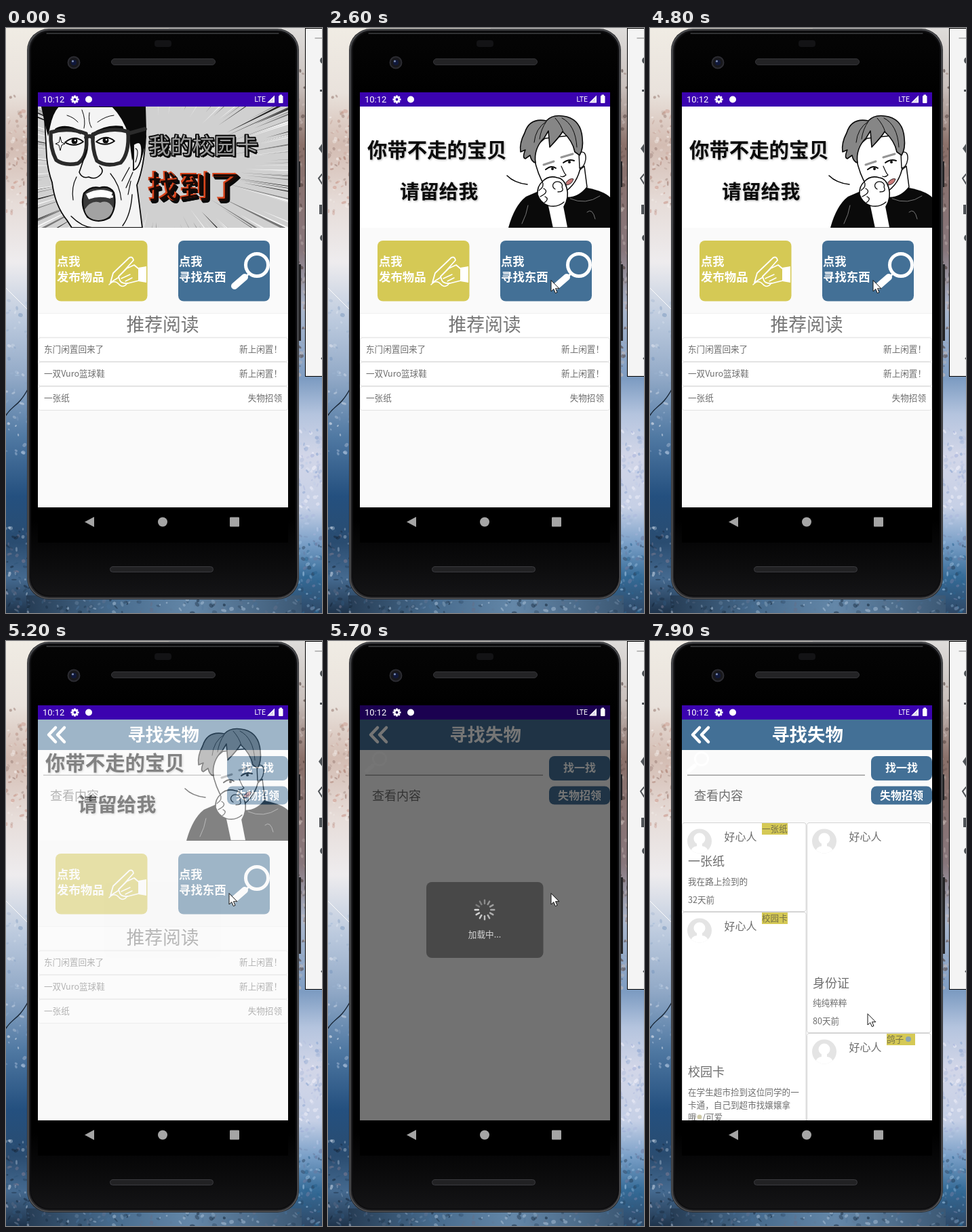
These frames come from a looping animation (466x864 px, 8000 ms). An HTML page with a canvas:

```html
<!DOCTYPE html>
<html lang="zh">
<head>
<meta charset="utf-8">
<style>
html, body { margin: 0; width: 100%; height: 100%; overflow: hidden; background: #000; }
canvas { display: block; width: 466px; height: 864px; }
</style>
</head>
<body>
<canvas id="stage"></canvas>
<script>
const W = 466, H = 864, LOOP = 8000;
const SCREEN = { x: 47, y: 95, w: 369, h: 613 };
const CJK = '"Noto Sans CJK SC", "Noto Sans CJK", "Noto Sans", sans-serif';
const INK = '#6e6e6e', PAPER = '#fafafa', WHITE = '#fff';
const BLUE = '#437096', GOLD = '#d5c955', LINE = '#dedede', BLACK = '#0a0a0a';
const scale = window.devicePixelRatio || 1;

const stage = document.getElementById('stage');
stage.width = W * scale;
stage.height = H * scale;
let g = stage.getContext('2d');

// ---------- helpers ----------
const clamp = v => Math.max(0, Math.min(1, v));
const ramp = (t, from, to) => clamp((t - from) / (to - from));
const smooth = v => v * v * (3 - 2 * v);

function seeded(seed) {
  return () => (seed = (seed * 16807) % 2147483647) / 2147483647;
}

function rect(x, y, w, h, fill) {
  g.fillStyle = fill;
  g.fillRect(x, y, w, h);
}

function paint(path, fill, stroke, lw) {
  if (fill) { g.fillStyle = fill; g.fill(path); }
  if (stroke) {
    g.strokeStyle = stroke;
    g.lineWidth = lw;
    g.lineCap = g.lineJoin = 'round';
    g.stroke(path);
  }
}

function round(x, y, w, h, r, fill, stroke, lw = 1) {
  const p = new Path2D();
  p.roundRect(x, y, w, h, r);
  paint(p, fill, stroke, lw);
}

function disc(x, y, r, fill, stroke, lw = 1) {
  const p = new Path2D();
  p.arc(x, y, r, 0, Math.PI * 2);
  paint(p, fill, stroke, lw);
}

function shape(d, fill, stroke, lw = 1) {
  paint(new Path2D(d), fill, stroke, lw);
}

function text(s, x, y, size, color = INK, { weight = 400, align = 'left', font = CJK } = {}) {
  g.font = `${weight} ${size}px ${font}`;
  g.textAlign = align;
  g.fillStyle = color;
  g.fillText(s, x, y);
}

// Heavy lettering, standing in for brush script
const bold = (s, x, y, size, color, align = 'left') =>
  text(s, x, y, size, color, { weight: 700, align });

function clipTo(x, y, w, h, draw) {
  g.save();
  g.beginPath();
  g.rect(x, y, w, h);
  g.clip();
  draw();
  g.restore();
}

function gradient(x0, y0, x1, y1, stops) {
  const gr = g.createLinearGradient(x0, y0, x1, y1);
  stops.forEach(([at, c]) => gr.addColorStop(at, c));
  return gr;
}

function layer(draw) {
  const c = document.createElement('canvas');
  c.width = W * scale;
  c.height = H * scale;
  const keep = g;
  g = c.getContext('2d');
  g.scale(scale, scale);
  draw();
  g = keep;
  return c;
}

const stamp = c => g.drawImage(c, 0, 0, W, H);

// ---------- desktop and phone ----------
function speckle(rnd, n, x, y, w, h, colors) {
  for (let i = 0; i < n; i++) {
    g.globalAlpha = 0.2 + rnd() * 0.45;
    g.fillStyle = colors[Math.floor(rnd() * colors.length)];
    g.beginPath();
    g.ellipse(x + rnd() * w, y + rnd() * h, 1 + rnd() * 3, 1 + rnd() * 2, rnd() * 3, 0, 7);
    g.fill();
  }
  g.globalAlpha = 1;
}

function wallpaper() {
  const rnd = seeded(77);
  rect(0, 0, 240, H, gradient(0, 0, 0, H, [
    [0, '#f0ece4'], [.11, '#e9e2dc'], [.2, '#d3bcb2'], [.3, '#e6dcd8'], [.4, '#eeecee'],
    [.5, '#bccade'], [.6, '#90a8c6'], [.7, '#4f78a2'], [.8, '#24507f'], [.88, '#2a4c70'],
    [.94, '#456a90'], [1, '#1f344c']]));
  rect(240, 0, 226, H, gradient(0, 0, 0, H, [
    [0, '#dedcda'], [.1, '#c9c0bc'], [.2, '#8a7069'], [.38, '#86757a'], [.48, '#a9b6cc'],
    [.6, '#7d9cc2'], [.66, '#b4c4de'], [.73, '#d2d6e8'], [.82, '#c6d0e6'], [.88, '#7ba0c8'],
    [.94, '#346a96'], [1, '#2f4866']]));
  rect(30, 838, 406, 26, gradient(30, 0, 436, 0, [
    [0, '#263c54'], [.3, '#466a8c'], [.6, '#6487a8'], [1, '#3c5874']]));
  speckle(rnd, 70, 0, 95, 34, 190, ['#a8786a', '#c8978a', '#f4eeea', '#9b8078']);
  speckle(rnd, 50, 0, 400, 34, 230, ['#a5bcd8', '#7f9cc0', '#dbe2ee']);
  speckle(rnd, 70, 0, 735, 34, 129, ['#16283c', '#b9c9dc', '#2f5478', '#7d7a90']);
  speckle(rnd, 70, 430, 60, 12, 455, ['#4b3a36', '#a08a84', '#c9bcb8']);
  speckle(rnd, 90, 432, 590, 34, 160, ['#f0f0fa', '#a9b4dc', '#bccce8', '#8ea6d0']);
  speckle(rnd, 70, 430, 750, 36, 114, ['#2a6490', '#6a7aa0', '#9cc0e0', '#20364e']);
  speckle(rnd, 110, 30, 843, 400, 21, ['#1c3046', '#a0b8d0', '#486f96', '#64708a']);
  shape('M0 572C10 556 18 560 33 532', null, '#1a2838', 1.5);
  shape('M0 384L32 416', null, '#fafafa', 1);
}

function sidePanel() {
  rect(441, 0, 25, 515, '#000');
  rect(442, 1, 24, 513, '#f4f4f4');
  const dark = '#505458';
  shape('M456 15H466', null, '#a6a6a6', 1.5);
  disc(468, 48, 5, dark);
  rect(463, 91, 3, 3, dark);
  shape('M466 171L461 178L466 185Z', dark);
  shape('M466 216L461 222L466 230', null, dark, 2);
  rect(462, 261, 4, 14, dark);
  disc(468, 310, 5, dark);
  disc(466, 488, 1.5, dark);
}

function phone() {
  rect(431, 197, 3, 38, '#242426');
  rect(431, 349, 4, 113, '#242426');
  round(31, 1, 401, 843, 32, '#2c2c2e');
  round(32.5, 2.5, 398, 840, 31, null, '#5a5c60', 1.2);
  round(36, 5, 392, 834, 28, gradient(0, 0, 0, H, [
    [0, '#050505'], [.12, '#000'], [.84, '#000'], [.92, '#0c0c0d'], [.98, '#161618']]),
    '#0e0e10', 2);
  shape('M60 8H402', null, '#5c5e62', 1);
  rect(47, 90, 369, 670, '#000');
  round(155.5, 45.5, 153, 9, 4.5, '#232325', '#343438');
  round(153.5, 795.5, 152, 8, 4, '#222224', '#3a3a3e');
  round(219, 18, 25, 10, 4, '#131315');
  disc(100, 51, 8.5, '#18181c', '#2c2c32', 2);
  disc(100, 51, 4, '#10183a');
  disc(98.5, 49, 1.6, '#7c8cb0');
  const nav = '#a5a5a5';
  shape('M116 729.5L130 722V737Z', nav);
  disc(231, 729.5, 7, nav);
  round(330, 722.5, 14, 14, 1, nav);
}

// ---------- banners ----------
function speedLines() {
  rect(47, 116, 369, 179, '#d0d0d0');
  const rnd = seeded(4021), cx = 225, cy = 205;
  for (let i = 0; i < 230; i++) {
    const a = rnd() * Math.PI * 2, near = 85 + rnd() * 85, half = 0.002 + rnd() * 0.010;
    const at = (r, da) => [cx + Math.cos(a + da) * r * 1.1, cy + Math.sin(a + da) * r * 0.75];
    g.fillStyle = rnd() < 0.45 ? '#f6f6f6' : rnd() < 0.5 ? '#222' : '#777';
    g.beginPath();
    g.moveTo(...at(near, 0));
    g.lineTo(...at(300, -half));
    g.lineTo(...at(300, half));
    g.fill();
  }
}

function faceBanner() {
  speedLines();
  const face = '#f4f4f4', ink = BLACK;
  shape('M56 116L60 190Q62 212 68 228Q72 262 90 284L97 295H201L193 232Q204 205 206 160L198 116Z', face, ink, 1.8);
  shape('M52 116H78Q69 126 65 146L62 160L57 140Z', ink);
  shape('M156 116H206L207 152Q206 176 199 196L194 170L186 196L181 158Q172 132 156 116Z', ink);
  shape('M188 172Q202 162 200 186Q198 206 188 210Z', face, ink, 1.8);
  shape('M191 178Q197 180 191 198', null, ink, 1.1);
  // brows, forehead creases and eyes
  shape('M72 149Q88 139 112 153L110 157Q90 147 73 154Z', ink);
  shape('M126 156Q148 141 172 145L174 150Q150 148 128 161Z', ink);
  shape('M112 121Q118 136 115 148M123 125Q121 139 126 147M90 129Q100 132 106 139M135 139Q147 130 159 129', null, ink, 1);
  for (const [x, y] of [[101, 168], [147, 167]]) {
    shape(`M${x - 14} ${y + 1}Q${x} ${y - 11} ${x + 13} ${y}Q${x} ${y + 9} ${x - 14} ${y + 1}Z`, WHITE, ink, 1.8);
    disc(x, y - 1, 4.5, ink);
    disc(x + 1, y - 2, 1.3, WHITE);
  }
  shape('M80 161L82 169L87 171L82 173L80 181L78 173L73 171L78 169Z', WHITE, ink, 1);
  // glasses
  const frame = '#2a2a2a';
  shape('M66 154Q92 146 118 156Q122 190 106 200Q86 204 74 195Q65 178 66 154Z', null, frame, 5.5);
  shape('M128 157Q156 146 180 153Q182 186 169 199Q148 206 134 196Q127 180 128 157Z', null, frame, 5.5);
  shape('M118 162Q123 157 128 162M180 156L205 149', null, frame, 5.5);
  // nose, cheeks, mouth
  shape('M119 180Q112 202 108 213Q112 223 122 220Q132 225 140 216M138 204Q145 210 140 216', null, ink, 1.6);
  shape('M104 220Q96 235 99 254M154 215Q168 232 170 254M182 206L171 226M187 213L177 236M184 226L180 246', null, ink, 1.2);
  shape('M115 244Q125 233 138 236Q152 232 159 243Q164 264 153 280Q135 290 120 279Q109 262 115 244Z', '#3a3a3a', ink, 2.2);
  shape('M118 245Q138 234 157 243L154 252Q138 247 122 253Z', WHITE);
  shape('M116 268Q126 253 139 258Q151 253 158 266Q155 283 136 284Q119 283 116 268Z', '#a2a2a2');
  disc(156, 249, 2, WHITE);
  shape('M96 278Q112 294 128 295M172 292Q184 276 186 246', null, ink, 1.4);

  // hollow line of lettering
  g.save();
  g.lineJoin = 'round';
  g.strokeStyle = ink;
  g.lineWidth = 2.4;
  bold('我的校园卡', 212, 188, 32.4, ink);
  g.strokeText('我的校园卡', 210, 186);
  text('我的校园卡', 210, 186, 32.4, '#9c9c9c', { weight: 300 });
  g.restore();
  // dark lettering with a glowing edge
  const title = '找到了';
  for (let i = 6; i > 2; i--) bold(title, 208 + i * .7, 250 + i * .7, 46, ink);
  bold(title, 208, 250, 46, '#d8441c');
  text(title, 209.6, 250.8, 46, '#1c0a06', { weight: 500 });
}

function treasureBanner() {
  rect(47, 116, 369, 179, WHITE);
  const ink = BLACK, skin = WHITE;
  g.save();
  g.shadowColor = '#a8a8a8';
  g.shadowBlur = 3 * scale;
  g.shadowOffsetX = g.shadowOffsetY = scale;
  bold('你带不走的宝贝', 58, 191, 29.4, ink);
  bold('请留给我', 106, 252, 28.8, ink);
  g.restore();
  shape('M264 218Q275 229 294 231', null, ink, 1.6);
  shape('M266 295Q275 262 292 249L322 236H382Q407 241 416 250V295Z', ink);
  shape('M382 272Q390 265 394 282M286 289Q293 275 295 262M357 252Q380 262 401 248', null, '#777', 1);
  shape('M341 235L378 204L382 235Q368 253 348 250Z', skin, ink, 1.5);
  shape('M302 178Q305 205 315 225Q332 250 352 240Q371 226 374 195L364 158L320 163Z', skin, ink, 1.6);
  shape('M370 184Q381 180 380 194Q378 206 371 207Z', skin, ink, 1.4);
  // hair
  shape('M322 137Q297 132 290 155Q282 170 284 183L291 180Q286 192 291 193L298 188Q300 198 306 199' +
        'Q303 178 319 162L325 152L327 176Q342 160 346 153Q361 167 364 183L371 188Q377 178 375 162' +
        'Q373 137 352 131Q332 126 322 137Z', '#868686', ink, 1.6);
  shape('M322 138Q306 148 304 169M322 138Q314 149 312 164M335 133Q344 143 347 154M345 133Q365 143 367 176', null, ink, 1);
  // features
  shape('M318 202L333 197M344 191L361 186', null, '#959595', 3);
  shape('M321 209Q329 202 336 207M347 199Q355 193 363 196', null, ink, 2);
  disc(331, 208, 2, ink);
  disc(356, 198, 2, ink);
  shape('M344 204Q349 216 351 217Q347 221 343 219', null, ink, 1.2);
  shape('M351 228Q357 221 362 223Q360 231 352 232Z', '#c87878', ink, .8);
  // fist and arm
  shape('M316 227Q308 234 309 246Q313 258 324 262L331 295H354L348 264Q356 250 352 236' +
        'Q348 222 338 221Q325 217 316 227Z', skin, ink, 1.6);
  shape('M316 227Q320 234 311 240M318 237Q327 242 313 249M320 249Q327 252 319 258' +
        'M335 238A7 6 0 1 1 345 235Q349 242 339 242M324 262Q338 266 348 257', null, ink, 1.3);
}

// ---------- home page ----------
function lens(x, y, s, color) {
  shape(`M${x - 13 * s} ${y + 14 * s}L${x - 17 * s} ${y + 18 * s}`, null, color, 3 * s);
  shape(`M${x - 18 * s} ${y + 18 * s}L${x - 33 * s} ${y + 31 * s}`, null, color, 10 * s);
  disc(x, y, 16.5 * s, null, color, 5 * s);
}

function homePage() {
  rect(47, 295, 369, 413, PAPER);
  round(73, 314, 135.5, 89.5, 8, GOLD);
  round(254, 314, 135, 89.5, 8, BLUE);
  bold('点我', 75, 351, 17.2, WHITE);
  bold('发布物品', 75, 373.5, 17.4, WHITE);
  bold('点我', 255, 351, 17.2, WHITE);
  bold('寻找东西', 255, 373.5, 17.4, WHITE);
  lens(370, 350, 1, WHITE);

  // writing hand
  shape('M154 376L158 362L182 339Q187 337 188 343L165 369Z', null, WHITE, 1.8);
  shape('M152 379Q160 371 166 378T178 378', null, WHITE, 1.6);
  shape('M166 367L178 355L189 350L196 356V373L180 377Q171 378 168 373Z', GOLD, WHITE, 1.8);
  shape('M170 370L183 364M176 374L186 369', null, WHITE, 1.4);
  shape('M195 354L207 352V376L195 374Z', WHITE);

  rect(47, 422, 369, 33, WHITE);
  rect(47, 421, 369, 1, '#f0f0f0');
  text('推荐阅读', 231, 447.5, 26.8, '#767676', { weight: 500, align: 'center' });
  [['东门闲置回来了', '新上闲置！'], ['一双Vuro篮球鞋', '新上闲置！'], ['一张纸', '失物招领']].forEach(([a, b], i) => {
    const y = 457 + i * 36;
    round(47.5, y + .5, 368, 35, 3, WHITE, LINE, .8);
    text(a, 56, y + 22, 12.6);
    text(b, 407, y + 22, 12.6, INK, { align: 'right' });
  });
}

// ---------- search page ----------
function searchPage() {
  rect(47, 116, 369, 592, PAPER);
  rect(47, 116, 369, 45, BLUE);
  shape('M73 128L63 138.5L73 149M86 128L76 138.5L86 149', null, WHITE, 4.5);
  bold('寻找失物', 232, 147.5, 26.4, WHITE, 'center');
  lens(76, 174, .58, WHITE);
  rect(55, 197.5, 262, 1.3, '#909090');
  round(326, 170, 90, 36, 8, BLUE);
  round(326, 214.5, 90, 27, 8, BLUE);
  bold('找一找', 371, 193, 16, WHITE, 'center');
  bold('失物招领', 371, 233.5, 16, WHITE, 'center');
  text('查看内容', 65, 235, 18);
}

function card(x, y, h, tag) {
  rect(x, y, 183, h, WHITE);
  round(x + .5, y + .5, 182.5, h, 3, null, '#d0d0d0', .9);
  g.save();
  g.beginPath();
  g.arc(x + 26, y + 27.5, 18, 0, 7);
  g.clip();
  rect(x, y, 50, 50, '#e4e4e4');
  disc(x + 26, y + 24, 8.5, WHITE);
  round(x + 13, y + 35, 26, 20, 9, WHITE);
  rect(x + 22, y + 29, 8, 8, WHITE);
  g.restore();
  text('好心人', x + 62.5, y + 27, 16);
  if (tag) {
    rect(x + 118, y + 1, tag.length > 2 ? 38 : 42, 17, GOLD);
    text(tag, x + 118, y + 14, 12.6, '#757048');
    if (tag.length < 3) disc(x + 150, y + 9, 4, '#8aa4b4');
  }
}

function results() {
  clipTo(47, 268, 369, 440, () => {
    card(47, 268, 131, '一张纸');
    text('一张纸', 56, 332, 18);
    text('我在路上捡到的', 56, 360, 12.6);
    text('32天前', 56, 387, 12.6);

    card(47, 400, 320, '校园卡');
    text('校园卡', 56, 643, 18);
    text('在学生超市捡到这位同学的一', 56, 671, 12.6);
    text('卡通，自己到超市找嬢嬢拿', 56, 690, 12.6);
    text('哦', 56, 708, 12.6);
    disc(73, 703, 3.5, '#cfcaa8');
    text('/可爱', 77, 708, 12.6);

    card(231, 268, 310);
    text('身份证', 240, 512, 18);
    text('纯纯粹粹', 240, 539, 12.6);
    text('80天前', 240, 566, 12.6);

    card(231, 579, 140, '鸽子');
  });
}

function loading(t) {
  round(145, 356, 172.5, 112, 8, '#484848');
  const step = Math.floor(t / 100);
  for (let i = 0; i < 12; i++) {
    const age = (step - i) % 12;
    g.save();
    g.translate(231, 397);
    g.rotate(i * Math.PI / 6);
    g.globalAlpha *= 1 - age * 0.06;
    round(-1.2, -15.5, 2.4, 7.5, 1.2, '#dcdcdc');
    g.restore();
  }
  text('加载中...', 231, 438, 12.6, '#d6d6d6', { align: 'center' });
}

// ---------- status bar ----------
function statusIcons() {
  const font = 'Roboto, sans-serif';
  text('10:12', 54, 110, 13, WHITE, { font });
  for (let i = 0; i < 8; i++) {
    g.save();
    g.translate(101.5, 105.5);
    g.rotate(i * Math.PI / 4);
    rect(-1.4, -6, 2.8, 3, WHITE);
    g.restore();
  }
  disc(101.5, 105.5, 3.2, null, WHITE, 2.6);
  disc(122, 105.5, 5, WHITE);
  text('LTE', 366.5, 109, 10.5, WHITE, { font });
  shape('M385 110.5H396V99.5Z', WHITE);
  shape('M388.5 109L394.5 109V103Z', '#d9d3ea');
  round(402, 100, 6.5, 11, 1, WHITE);
  rect(403.5, 98.5, 3.5, 2, WHITE);
}

// ---------- pointer ----------
const PATH = [[1450, 470, 391], [1600, 450, 388], [2400, 329, 373], [6500, 329, 373],
  [6800, 326, 378], [7700, 321, 551], [8000, 321, 551]];

function pointer(t) {
  if (t < PATH[0][0]) return;
  const i = PATH.findIndex(p => t < p[0]);
  const [t0, x0, y0] = PATH[i - 1], [t1, x1, y1] = PATH[i];
  const k = smooth(ramp(t, t0, t1));
  g.save();
  g.translate(x0 + (x1 - x0) * k, y0 + (y1 - y0) * k);
  shape('M0 0V16L3.8 12.6L6.4 18.6L9 17.4L6.5 11.7H11.5Z', WHITE, '#151515', 1);
  g.restore();
}

// ---------- timeline ----------
const base = layer(() => { wallpaper(); sidePanel(); phone(); });
const slides = [layer(faceBanner), layer(treasureBanner)];
const home = layer(homePage);
const search = layer(searchPage);
const found = layer(results);
const status = layer(statusIcons);

function homeView(t) {
  const slide = 369 * (1 - (1 - ramp(t, 1080, 1680)) ** 2);
  clipTo(47, 116, 369, 179, () => slides.forEach((s, i) => {
    const dx = i * 369 - slide;
    clipTo(47 + dx, 116, 369, 179, () => g.drawImage(s, dx, 0, W, H));
  }));
  stamp(home);
}

function draw(t) {
  g.setTransform(scale, 0, 0, scale, 0, 0);
  stamp(base);
  clipTo(SCREEN.x, SCREEN.y, SCREEN.w, SCREEN.h, () => {
    rect(47, 95, 369, 21, '#3b03b0');
    const open = ramp(t, 5100, 5300);
    if (open < 1) homeView(t);
    if (open > 0) {
      g.globalAlpha = open;
      stamp(search);
      g.globalAlpha = 1;
      if (t >= 6200) stamp(found);
    }
    const dim = ramp(t, 5200, 5400) * (1 - ramp(t, 6200, 6350));
    if (dim > 0) {
      rect(47, 95, 369, 613, `rgba(0,0,0,${0.54 * dim})`);
      g.globalAlpha = dim;
      loading(t);
      g.globalAlpha = 1;
    }
    stamp(status);
  });
  pointer(t);
}

const start = performance.now();
function tick() {
  draw((performance.now() - start) % LOOP);
  requestAnimationFrame(tick);
}
tick();
</script>
</body>
</html>
```
